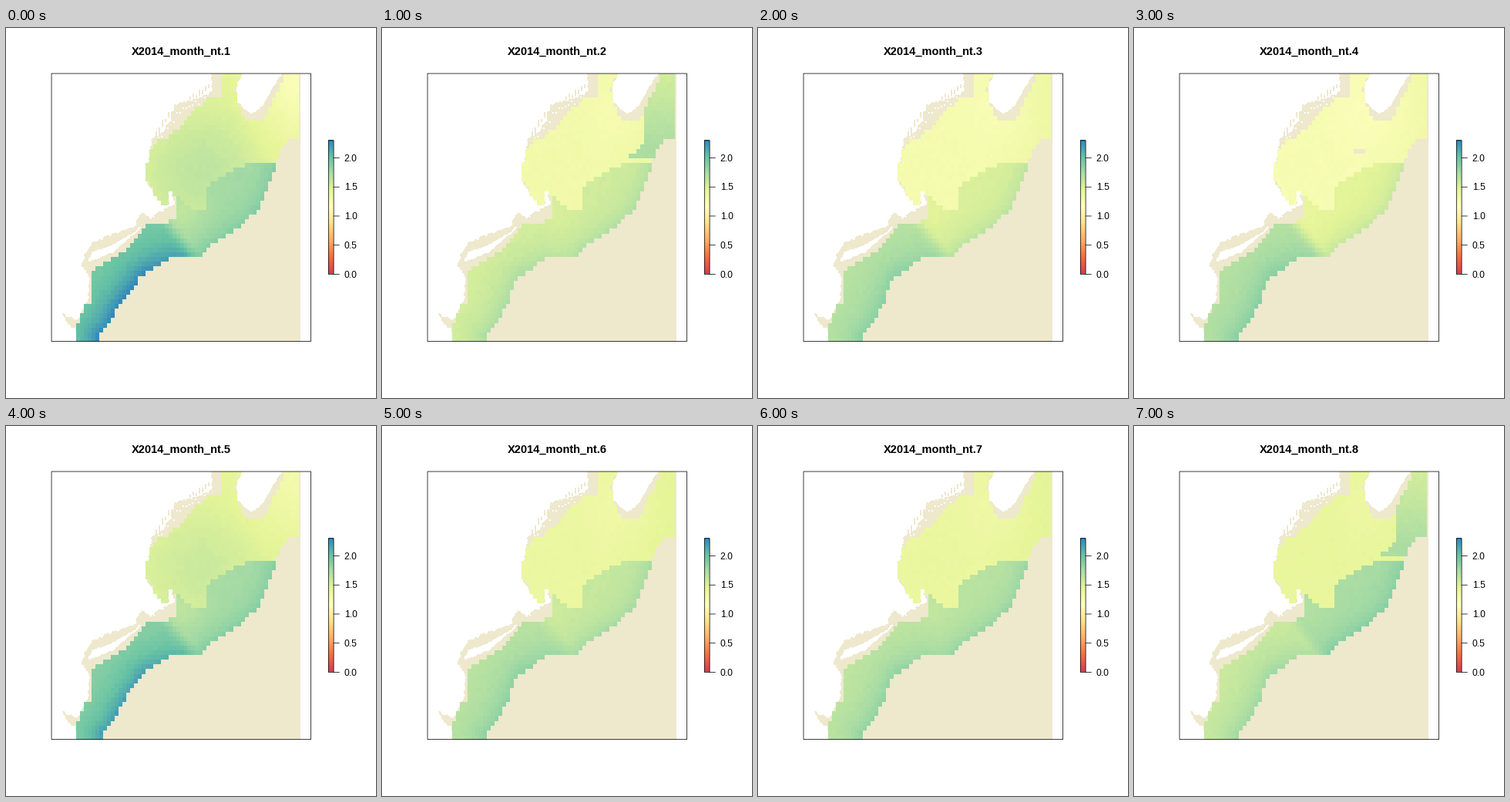
Write a matplotlib script that moves like this. It is 480 px wide and 480 px high and loops after 8000 ms.

```python
import numpy as np
import matplotlib.pyplot as plt
from matplotlib.animation import FuncAnimation
from matplotlib.colors import LinearSegmentedColormap
from matplotlib.patches import Polygon, Rectangle
from matplotlib.path import Path

SIZE, DPI = 480, 80
PX = 72 / DPI  # points per pixel
BEIGE, INK = "#EEE8CD", "black"
VMAX = 2.3
SPECTRAL = LinearSegmentedColormap.from_list("spectral9", [
    "#D53E4F", "#F46D43", "#FDAE61", "#FEE08B", "#FFFFBF",
    "#E6F598", "#ABDDA4", "#66C2A5", "#3288BD"])

# Map frame and data grid in pixel coordinates
X0, Y0, X1, Y1 = 59.04, 59.04, 395.5, 406.56
COLS, ROWS = 58, 57
LEFT, CW, CH = 91.3, 4.98, (Y1 - Y0) / ROWS
X, Y = np.meshgrid(LEFT + CW * (np.arange(COLS) + .5),
                   Y0 + CH * (np.arange(ROWS) + .5))

# Key points; the grid steps and the ragged shore follow from them
MAINLAND = [(59, 59), (266, 59), (266, 82), (246, 92), (219, 99), (214, 118),
            (202, 135), (189, 143), (186, 165), (181, 180), (183, 203),
            (204, 230), (213, 228), (208, 210), (213, 211), (219, 229),
            (197, 238), (188, 247), (176, 238), (166, 257), (114, 276),
            (101, 294), (98, 310), (107, 322), (106, 352), (92, 378),
            (73, 370), (76, 380), (90, 393), (91, 407), (59, 407)]
ISLAND = [(107, 303), (112, 291), (138, 282), (168, 265), (175, 258),
          (140, 290)]
PENINSULA = [(307, 59), (300, 74), (300, 95), (318, 111), (333, 100),
             (344, 80), (358, 59)]
COAST = [(91, 407), (91, 391), (103, 359), (111, 357), (111, 316), (154, 289),
         (171, 266), (182, 254), (204, 254), (219, 246), (219, 218),
         (211, 211), (211, 227), (203, 230), (183, 200), (183, 178),
         (189, 152), (206, 143), (231, 126), (243, 108), (262, 92), (280, 92),
         (280, 57), (307, 57), (297, 82), (310, 122), (335, 122), (345, 97),
         (360, 67), (360, 57), (381, 57)]
SHELF = [(381, 140), (360, 150), (352, 174), (341, 206), (331, 230),
         (311, 252), (262, 285), (250, 297), (216, 297), (176, 324),
         (161, 361), (146, 388), (136, 398), (136, 407)]
BANK_RIM = [(211, 211), (246, 236), (259, 234), (263, 205), (290, 186),
            (318, 174), (350, 172)]

# One entry per month: base levels, and how strong the shelf contrast is
GULF = [1.42, 1.30, 1.27, 1.24, 1.42, 1.37, 1.38, 1.40]
BANK = [1.74, 1.54, 1.49, 1.44, 1.73, 1.59, 1.65, 1.72]
BIGHT = [1.89, 1.50, 1.64, 1.65, 1.83, 1.63, 1.61, 1.55]
CONTRAST = [1, 0, 0, 0, .7, 0, 0, 0]
SCOTIA_MONTHS = (1, 7)
GAP_MONTH = 3


def ramp(v, start, end):
    return np.clip((v - start) / (end - start), 0, 1)


def bell(x, y, rx, ry):
    return np.exp(-((X - x) / rx) ** 2 - ((Y - y) / ry) ** 2)


def inside(points):
    cells = np.column_stack([X.ravel(), Y.ravel()])
    return Path(points).contains_points(cells).reshape(X.shape)


def edge_distance(points):
    dist = np.full(X.shape, 1e6)
    for (px, py), (qx, qy) in zip(points, points[1:]):
        dx, dy = qx - px, qy - py
        t = np.clip(((X - px) * dx + (Y - py) * dy) / (dx**2 + dy**2), 0, 1)
        dist = np.minimum(dist, np.hypot(X - px - t * dx, Y - py - t * dy))
    return dist


ON_BANK = (Y > np.interp(X, *zip(*BANK_RIM))) & ((X > 211) | (Y > 232))
IN_SCOTIA = (Y < 167) & (X > 340 - 20 * ramp(Y, 150, 166))
BIGHT_MIX = ramp(205 + (Y - 250) * .85 - X, -10, 10)
GRAIN = np.random.default_rng(4).normal(0, .006, X.shape)


def field(month):
    s = CONTRAST[month]
    shelf = [(x - 15 * s * ramp(y, 320, 345), y) for x, y in SHELF]
    dist = edge_distance(shelf)

    east = ramp(X, 290, 370)
    gulf = (GULF[month] + .21 * s * bell(255, 188, 85, 85)
            - .22 * s * east * ramp(Y, 190, 80)
            + (1 - s) * (.07 * east - .06 * bell(316, 110, 40, 45)))
    if month in SCOTIA_MONTHS:
        gulf = np.where(IN_SCOTIA, 1.54 + .18 * ramp(Y, 65, 155), gulf)

    bank = (BANK[month] + .15 * np.exp(-dist / 16)
            - (.04 + .08 * s) * bell(230, 238, 28, 30))
    bight = (BIGHT[month] + (.22 + .2 * s) * np.exp(-dist / 25)
             * (1 - .5 * ramp(X, 180, 245)))
    south = bank + (bight - bank) * BIGHT_MIX
    value = np.where(ON_BANK, south, gulf) + GRAIN

    sea = inside(COAST + shelf)
    if month == GAP_MONTH:
        sea &= ~((abs(X - 293) < 8) & (abs(Y - 157) < CH / 2))
    return np.ma.masked_where(~sea, value)


def ragged(points, rng, amp):
    """Break the sides inside the map into short jittered steps."""
    out = []
    for a, b in zip(points, points[1:] + points[:1]):
        a, b = np.array(a, float), np.array(b, float)
        out.append(a)
        on_frame = any(a[k] == b[k] and a[k] in (59, 407) for k in (0, 1))
        if not on_frame:
            n = max(1, int(np.hypot(*(b - a)) / 2))
            out += [a + (b - a) * k / n + rng.uniform(-amp, amp, 2)
                    for k in range(1, n)]
    return out


fig = plt.figure(figsize=(SIZE / DPI, SIZE / DPI), dpi=DPI, facecolor="white")
ax = fig.add_axes([0, 0, 1, 1])
ax.axis("off")
STROKE = dict(lw=.75 * PX, zorder=6, snap=False)


def outline(x0, y0, x1, y1):
    ax.add_patch(Rectangle((x0, y0), x1 - x0, y1 - y0, fill=False, ec=INK,
                           joinstyle="miter", **STROKE))


def block(x, y, w, h, color, z):
    ax.add_patch(Rectangle((x, y), w, h, fc=color, lw=0, zorder=z))


def label(x, y, text, px, **style):
    return ax.text(x, y, text, family="Liberation Sans", size=px * PX,
                   color=INK, va="baseline", **style)


# Sea and land
block(X0, Y0, 322.7, Y1 - Y0, BEIGE, 1)
rng = np.random.default_rng(11)
for shape, amp in ((MAINLAND, 1.8), (ISLAND, 1), (PENINSULA, 1)):
    ax.add_patch(Polygon(ragged(shape, rng, amp), fc="white", lw=0, zorder=2,
                         antialiased=False))

# Inlets and islets along the northern coast
for x in np.linspace(194, 262, 18):
    y = np.interp(x, [194, 215, 246, 262], [141, 108, 92, 76])
    y += rng.uniform(-5, 5)
    block(x, y - 5, 1.5, rng.uniform(4, 10), BEIGE, 3)
    block(x + 3, y + rng.uniform(2, 7), 2, 2, "white", 3)

# Data cells
cells = ax.imshow(field(0), cmap=SPECTRAL, vmin=0, vmax=VMAX,
                  extent=(LEFT, LEFT + COLS * CW, Y1, Y0),
                  interpolation="nearest", aspect="auto", zorder=4)
outline(X0, Y0, X1, Y1)

# Colour key
KEY_L, KEY_R, KEY_T, KEY_B = 418.3, 425.1, 145.9, 319.4
ax.imshow(np.linspace(VMAX, 0, 174)[:, None], cmap=SPECTRAL, vmin=0, vmax=VMAX,
          extent=(KEY_L, KEY_R, KEY_B, KEY_T), aspect="auto", zorder=4)
outline(KEY_L, KEY_T, KEY_R, KEY_B)
for tick in np.arange(0, 2.1, .5):
    y = KEY_B - tick / VMAX * (KEY_B - KEY_T)
    ax.plot([KEY_R, KEY_R + 7.2], [y, y], color=INK, **STROKE)
    label(438.7, y + 4.1, f"{tick:.1f}", 12)

title = label(227.5, 35, "", 14.6, weight="bold", ha="center")
ax.set_xlim(0, SIZE)
ax.set_ylim(SIZE, 0)


def draw(i):
    cells.set_data(field(i))
    title.set_text(f"X2014_month_nt.{i + 1}")
    return cells, title


anim = FuncAnimation(fig, draw, frames=len(GULF), interval=1000,
                     repeat=True, repeat_delay=0)
plt.show()
```
